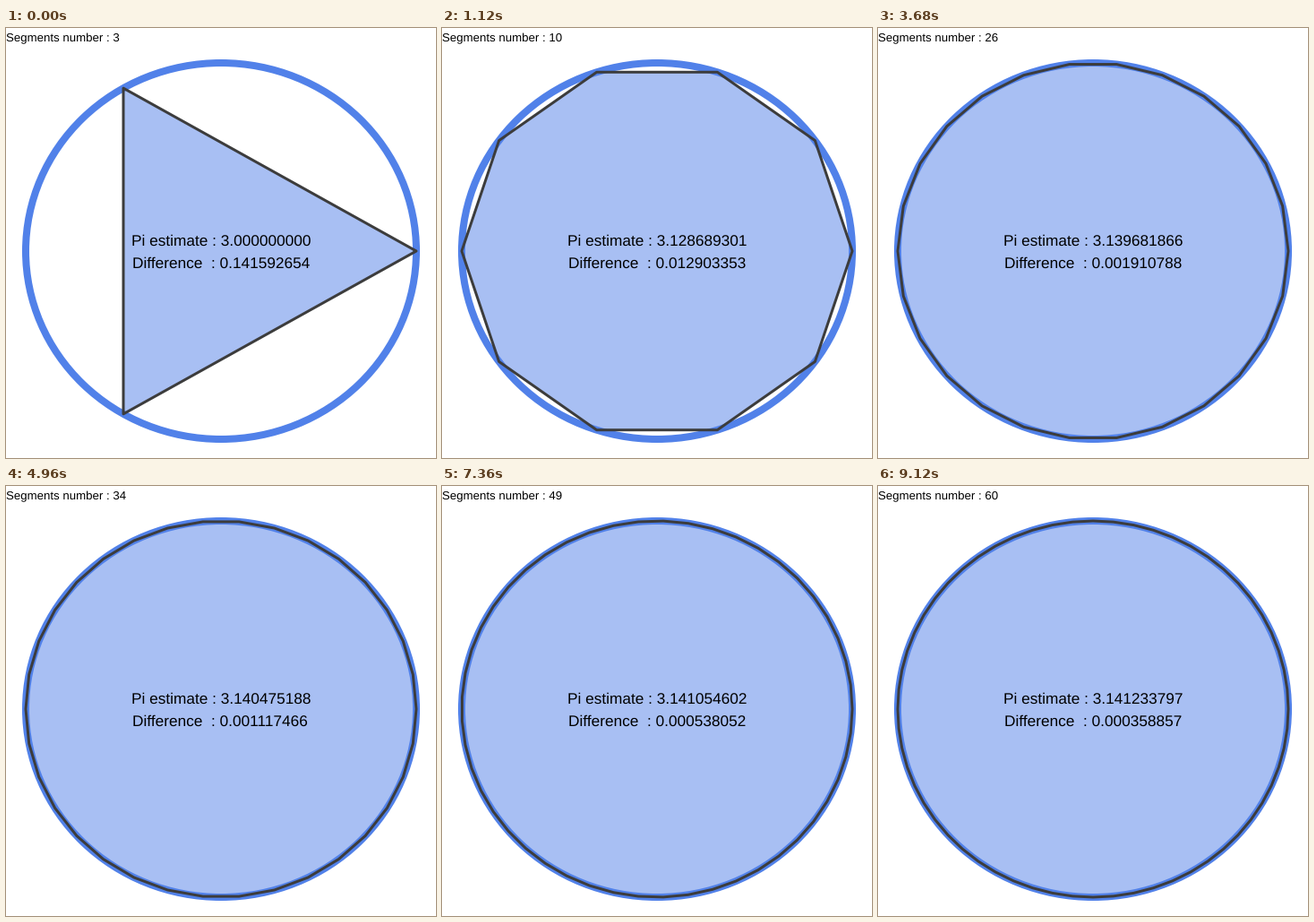
Recreate the animation shown at these times as a matplotlib script. Size 480x480 px, loop 9.28 s.

```python
import math

import matplotlib.pyplot as plt
import numpy as np
from matplotlib.animation import FuncAnimation
from matplotlib.patches import Ellipse, Polygon

SIZE, DPI = 480, 100
PT = 72 / DPI  # points per pixel
CX, CY, RX, RY = 240, 249, 218, 210
FIRST, LAST = 3, 60
BLUE, PALE, DARK = "#5181e9", "#a8bff3", "#3c3c3c"

plt.rcParams["font.family"] = "Liberation Sans"
plt.rcParams["text.hinting"] = "none"

fig = plt.figure(figsize=(SIZE / DPI, SIZE / DPI), dpi=DPI, facecolor="white")
ax = fig.add_axes([0, 0, 1, 1])
ax.set_xlim(0, SIZE)
ax.set_ylim(SIZE, 0)
ax.axis("off")


def corners(n):
    a = 2 * np.pi * np.arange(n) / n
    return np.column_stack([CX + RX * np.cos(a), CY + RY * np.sin(a)])


def label(x, y, px):
    return ax.text(x, y, "", fontsize=px * PT, color="black",
                   ha="left", va="baseline", zorder=4)


area = ax.add_patch(Polygon(corners(FIRST), fc=PALE, ec="none", zorder=1))
ax.add_patch(Ellipse((CX, CY), 2 * RX, 2 * RY, fill=False, ec=BLUE,
                     lw=8 * PT, zorder=2))
outline = ax.add_patch(Polygon(corners(FIRST), fill=False, ec=DARK, lw=3 * PT,
                               joinstyle="round", snap=False, zorder=3))
count = label(0, 15, 13.2)
estimate = label(140, 243, 17.2)
difference = label(141, 268, 17.2)


def update(i):
    n = FIRST + i
    pts = corners(n)
    area.set_xy(pts)
    outline.set_xy(pts)
    pi_n = 2 * n * math.sin(math.pi / (2 * n))
    count.set_text(f"Segments number : {n}")
    estimate.set_text(f"Pi estimate : {pi_n:.9f}")
    difference.set_text(f"Difference  : {math.pi - pi_n:.9f}")
    return area, outline, count, estimate, difference


anim = FuncAnimation(fig, update, frames=LAST - FIRST + 1, interval=160,
                     repeat=True, repeat_delay=0, blit=False)
plt.show()
```
